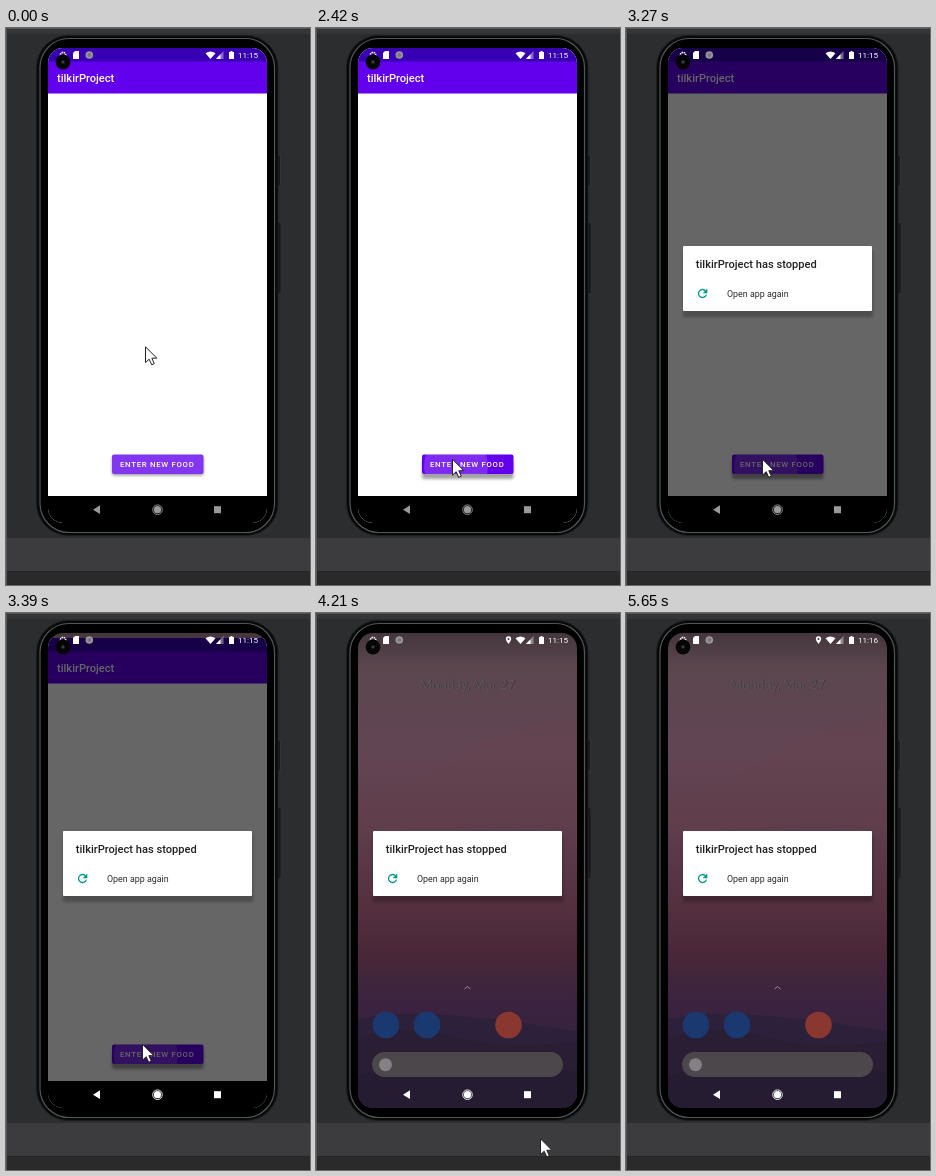
Recreate the animation shown at these times as an HTML page. Size 304 by 557 pixels, loop 5800 ms.

```html
<!DOCTYPE html>
<html lang="en">
<head>
<meta charset="utf-8">
<title>App crash demo</title>
<style>
  html, body { margin: 0; width: 100%; height: 100%; overflow: hidden; background: #2c2d2f; }
  svg { display: block; width: 304px; height: 557px; font-family: Roboto, sans-serif; }
  .medium { font-weight: 500; }
</style>
</head>
<body>
<svg viewBox="0 0 304 557">
  <defs>
    <clipPath id="screen"><rect x="42" y="20" width="219" height="475" rx="15"/></clipPath>
    <clipPath id="buttonShape"><rect x="106" y="426.5" width="91.5" height="19.5" rx="2"/></clipPath>
    <linearGradient id="sky" x1="0" y1="0" x2="0" y2="1">
      <stop offset="0" stop-color="#43363c"/>
      <stop offset=".07" stop-color="#5b464e"/>
      <stop offset=".25" stop-color="#624553"/>
      <stop offset=".42" stop-color="#5d3c4b"/>
      <stop offset=".58" stop-color="#54303f"/>
      <stop offset=".68" stop-color="#482738"/>
      <stop offset=".78" stop-color="#3b2340"/>
      <stop offset="1" stop-color="#2c2038"/>
    </linearGradient>
    <filter id="blur" x="-20%" y="-60%" width="140%" height="220%"><feGaussianBlur stdDeviation="1.6"/></filter>
  </defs>

  <!-- desktop and phone body -->
  <rect width="304" height="557" fill="#2c2d2f"/>
  <rect width="304" height="6" fill="#343537"/>
  <rect y="510" width="304" height="33" fill="#3c3c3e"/>
  <rect y="543" width="304" height="14" fill="#2b2a2b"/>
  <rect y="543" width="304" height="1" fill="#242526"/>
  <path d="M.5 557V.5H304" fill="none" stroke="#555658"/>
  <rect x="271" y="127" width="3.5" height="31" rx="1" fill="#17191a" stroke="#3e4042" stroke-width=".6"/>
  <rect x="271" y="195" width="3.5" height="70" rx="1" fill="#17191a"/>
  <rect x="30.5" y="7.5" width="241.5" height="500" rx="32" fill="#080909" stroke="#1b1c1d"/>
  <rect x="34" y="10.5" width="234.5" height="494" rx="29" fill="#000" stroke="#535657" stroke-width="1.2"/>

  <g clip-path="url(#screen)">
    <!-- home screen -->
    <rect x="42" y="20" width="219" height="475" fill="url(#sky)"/>
    <path d="M42 185Q120 165 150 140T261 105V215Q160 205 42 225Z" fill="#6a3f4c" opacity=".22"/>
    <path d="M42 406Q80 398 130 402T200 409T261 418V495H42Z" fill="#2d203a"/>
    <path d="M42 425Q90 410 140 424T261 428V495H42Z" fill="#291e34"/>
    <path d="M42 462Q150 441 261 459V495H42Z" fill="#251c31"/>
    <text x="104.8" y="76" font-size="13.4" fill="#2c2228" opacity=".7">Monday, Mar 27</text>
    <text x="104.2" y="75.5" font-size="13.4" fill="#5c5659">Monday, Mar 27</text>
    <g id="dock">
      <path d="M148.5 376L151.5 373.5L154.5 376" fill="none" stroke="#96909a"/>
      <circle cx="70" cy="412" r="13.3" fill="#1a3971"/>
      <circle cx="111" cy="412" r="13.3" fill="#1a3971"/>
      <circle cx="192.5" cy="412" r="13.3" fill="#8a372f"/>
      <rect x="56" y="439" width="191" height="25" rx="12.5" fill="#4b474b"/>
      <circle cx="69.5" cy="451.7" r="6.5" fill="#858085"/>
    </g>

    <!-- app window -->
    <g id="app">
      <rect x="42" y="20" width="219" height="475" fill="#fff"/>
      <rect x="42" y="20" width="219" height="14" fill="#3700b3"/>
      <rect x="42" y="33.5" width="219" height="32" fill="#6200ee"/>
      <text class="medium" x="51" y="53.5" font-size="11.1" fill="#fff">tilkirProject</text>
      <rect id="shadow" x="106" width="91.5" height="19" rx="2" filter="url(#blur)"/>
      <g clip-path="url(#buttonShape)">
        <rect id="button" x="106" y="426" width="92" height="20"/>
        <circle id="ripple" cx="140" cy="438" r="32" fill="#fff" opacity=".17"/>
      </g>
      <text class="medium" x="114" y="439" font-size="7.8" letter-spacing=".7" fill="#fff">ENTER NEW FOOD</text>
      <rect id="dim" x="42" y="20" width="219" height="475"/>
    </g>
    <rect id="navBar" x="42" y="468" width="219" height="27"/>

    <!-- crash dialog -->
    <g id="dialog">
      <rect x="57" y="223" width="190" height="66" filter="url(#blur)" opacity=".24"/>
      <rect x="57" y="218" width="189" height="65" rx="1" fill="#fff"/>
      <text class="medium" x="69.8" y="240.3" font-size="11.1" fill="#212121">tilkirProject has stopped</text>
      <path d="M79.3 262.6A4 4 0 1 0 80.4 266.6" fill="none" stroke="#009688" stroke-width="1.3"/>
      <path d="M81.3 260.6V265.2H76.7Z" fill="#009688"/>
      <text x="101" y="268.7" font-size="8.9" fill="#2a2a2a">Open app again</text>
    </g>

    <!-- status bar -->
    <g fill="#fff">
      <circle cx="57" cy="27" r="2.6" fill="none" stroke="#fff" stroke-width="1.7" stroke-dasharray="1.4 .7"/>
      <path d="M67 25L69 23H73V31H67Z"/>
      <circle cx="83.3" cy="27" r="3.8" fill="#98959b"/>
      <circle cx="83.3" cy="27" r="2" fill="#7c787f"/>
      <path id="pin" d="M192.5 31Q189.8 27.7 189.8 26A2.7 2.7 0 0 1 195.2 26Q195.2 27.7 192.5 31ZM192.5 25a1 1 0 1 0 .01 0Z" fill-rule="evenodd"/>
      <path d="M199.5 25.3Q204.5 21.5 209.5 25.3L204.5 31Z"/>
      <path d="M210 31L217.5 23V31Z" opacity=".4"/>
      <path d="M210 31L214.5 26.2V31Z"/>
      <path d="M223 24H224.5V23H226.5V24H228V31H223Z"/>
      <text id="clock" x="232" y="30" font-size="8.1"></text>
    </g>
    <circle cx="57" cy="34" r="7.4" fill="#050505"/>
    <circle cx="57" cy="34" r="2" fill="#202326"/>
    <circle cx="57" cy="34" r=".8" fill="#5b6065"/>

    <g id="navIcons">
      <path d="M87 481.7L94 477.3V486.1Z"/>
      <circle cx="151.5" cy="481.7" r="3.6"/>
      <circle cx="151.5" cy="481.7" r="4.8" fill="none" stroke-width=".9"/>
      <rect x="208" y="478.2" width="7" height="7"/>
    </g>
  </g>

  <path id="cursor" d="M.5 .8V16.6L4.2 13.2L6.7 18.8L9.3 17.6L6.8 12.2H11.8Z" fill="#fff" stroke="#222" stroke-width="1"/>
</svg>
<script>
  const LOOP = 5800;
  const el = id => document.getElementById(id);
  const set = (id, attrs) => {
    for (const name in attrs) el(id).setAttribute(name, attrs[name]);
  };

  // Each row: start time, then the values held from there on.
  const tracks = {
    cursor: [
      [0, 139, 318], [1460, 139, 340], [1580, 138, 372], [1730, 138, 396],
      [1850, 138, 416], [1970, 138, 427], [2120, 138, 429], [2270, 136, 430.5],
      [3970, 146, 443], [4090, 184, 485], [4210, 224, 525], [4360, 320, 600]
    ],
    // fill, shadow y, shadow opacity, ripple
    button: [
      [0, '#8236f1', 428.5, .4, 0], [600, '#6200ee', 428, .35, 0], [2420, '#6200ee', 432, .36, 1]
    ],
    dim: [[0, 0], [2980, .17], [3270, .6]],
    slide: [[0, 0], [3390, 5], [3540, 457], [3690, 480]],
    navIcons: [[0, '#9a9a9a'], [3390, '#fff']],
    navBar: [[0, 1], [3540, 0]],
    dock: [[0, 0], [4360, -13], [4510, -2], [5060, -1], [5400, 0]],
    pin: [[0, 0], [3690, 1]],
    clock: [[0, '11:15'], [5650, '11:16']]
  };

  const at = (name, t) => tracks[name].filter(row => row[0] <= t).pop().slice(1);
  const move = (x, y) => ({ transform: `translate(${x} ${y})` });

  function draw(t) {
    const [fill, y, opacity, ripple] = at('button', t);
    const [dim] = at('dim', t);
    const [iconColor] = at('navIcons', t);
    set('button', { fill });
    set('shadow', { y, opacity });
    set('ripple', { visibility: ripple ? 'visible' : 'hidden' });
    set('dim', { opacity: dim });
    set('dialog', { visibility: dim ? 'visible' : 'hidden' });
    set('app', move(0, at('slide', t)[0]));
    set('dock', move(0, at('dock', t)[0]));
    set('cursor', move(...at('cursor', t)));
    set('navBar', { opacity: at('navBar', t)[0] });
    set('navIcons', { fill: iconColor, stroke: iconColor, 'stroke-width': 0 });
    set('pin', { opacity: at('pin', t)[0] });
    el('clock').textContent = at('clock', t)[0];
  }

  const start = performance.now();
  function tick() {
    draw((performance.now() - start) % LOOP);
    requestAnimationFrame(tick);
  }
  tick();
</script>
</body>
</html>
```
